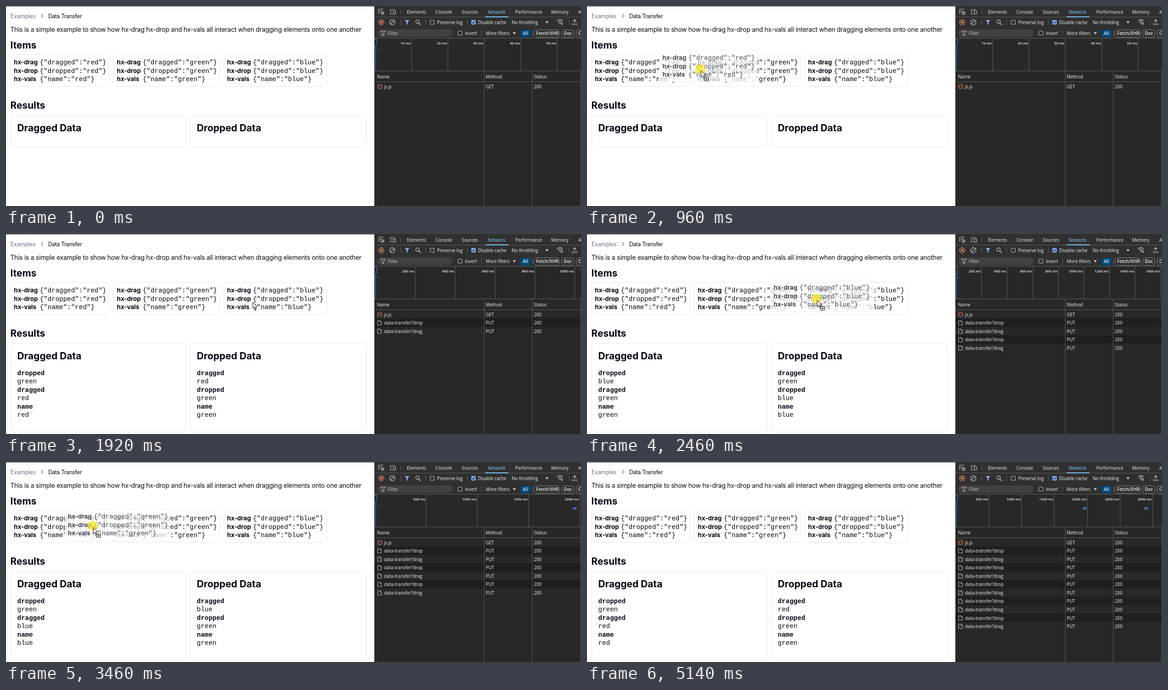
These frames come from a looping animation (1268 px wide and 442 px high, 5540 ms). An HTML page with a canvas:

```html
<!DOCTYPE html>
<html lang="en">
<head>
<meta charset="utf-8">
<title>Data Transfer</title>
<style>
html, body { margin: 0; width: 100%; height: 100%; overflow: hidden; background: #fff; }
canvas { display: block; }
</style>
</head>
<body>
<canvas id="stage" width="1268" height="442"></canvas>
<script>
const ctx = document.getElementById('stage').getContext('2d');
const LOOP = 5540, STEP = 68.1;
const SANS = 'Inter, sans-serif', MONO = '"Liberation Mono", monospace', UI = '"Open Sans", "Noto Sans", sans-serif';
const INK = '#020817', EDGE = '#e2e8f0', PANEL = '#282828', BAR = '#303030', LINE = '#5e5e5e';
const LIGHT = '#f0f0f0', ICON = '#c7c7c7', BLUE = '#7cacf8', ACTIVE = '#7fcfff';

const cards = [
  { name: 'red', x: 10, w: 218 },
  { name: 'green', x: 237, w: 234 },
  { name: 'blue', x: 480, w: 228 }
];

// Pointer path: step, x, y
const path = [
  [1, 1131, 436], [3, 880, 370], [6, 290, 190], [8, 68, 150], [9, 95, 153], [10, 102, 153],
  [12, 160, 148], [14, 251, 143], [16, 285, 145], [17, 290, 146], [21, 390, 148], [22, 407, 148],
  [24, 426, 148], [26, 535, 149], [27, 540, 150], [29, 548, 150], [31, 580, 152], [32, 583, 152],
  [34, 560, 149], [36, 507, 146], [38, 400, 147], [39, 385, 147], [40, 370, 146], [43, 235, 141],
  [46, 300, 148], [49, 215, 145], [50, 192, 144], [55, 192, 144], [57, 181, 153], [59, 192, 153],
  [62, 292, 150], [64, 330, 148], [65, 335, 150], [72, 1066, 436], [74, 1236, 437]
];

const drags = [
  { card: 0, from: 10, to: 16 },
  { card: 1, from: 22, to: 27 },
  { card: 2, from: 32, to: 39 },
  { card: 1, from: 46, to: 55 },
  { card: 0, from: 57, to: 64 }
];

// Results and timeline scale after each drop
const stages = [
  { at: 0, ms: 10, px: 80.3 },
  { at: 17, ms: 200, px: 88.1, drag: 'red', drop: 'green' },
  { at: 29, ms: 200, px: 56.4, drag: 'green', drop: 'blue' },
  { at: 40, ms: 500, px: 112.8, drag: 'blue', drop: 'green' },
  { at: 56, ms: 500, px: 90.3, drag: 'green', drop: 'red' },
  { at: 66, ms: 500, px: 72.3, drag: 'red', drop: 'green' }
];

function text(str, x, y, font, color, spacing = 0, align = 'left') {
  ctx.font = font;
  ctx.fillStyle = color;
  ctx.letterSpacing = spacing + 'px';
  ctx.textAlign = align;
  ctx.fillText(str, x, y);
}

function rect(x, y, w, h, color) {
  ctx.fillStyle = color;
  ctx.fillRect(x, y, w, h);
}

function round(x, y, w, h, r, fill, stroke) {
  ctx.beginPath();
  ctx.roundRect(x + 0.5, y + 0.5, w - 1, h - 1, r);
  if (fill) { ctx.fillStyle = fill; ctx.fill(); }
  if (stroke) { ctx.strokeStyle = stroke; ctx.lineWidth = 1; ctx.stroke(); }
}

function shape(d, x, y, stroke, fill, width = 1.2) {
  const p = new Path2D(d);
  ctx.save();
  ctx.translate(x, y);
  if (fill) { ctx.fillStyle = fill; ctx.fill(p); }
  if (stroke) { ctx.strokeStyle = stroke; ctx.lineWidth = width; ctx.stroke(p); }
  ctx.restore();
}

function circle(x, y, r, stroke, fill) {
  ctx.beginPath();
  ctx.arc(x, y, r, 0, 7);
  if (fill) { ctx.fillStyle = fill; ctx.fill(); }
  if (stroke) { ctx.strokeStyle = stroke; ctx.lineWidth = 1.3; ctx.stroke(); }
}

const ui = (str, x, y, color = LIGHT, weight = 500) => text(str, x, y, `${weight} 10px ${UI}`, color, -0.1);
const heading = (str, x, y) => text(str, x, y, `700 21.2px ${SANS}`, INK);
const mono = (str, x, y, weight = 400) => text(str, x, y, `${weight} 14.4px ${MONO}`, INK);

function drawCard({ name, x, w }, dx = 0, dy = 0) {
  ctx.save();
  ctx.translate(x + dx, 107 + dy);
  round(0, 0, w, 71, 7, '#fff', EDGE);
  ['drag', 'drop', 'vals'].forEach((word, i) => {
    const key = ['dragged', 'dropped', 'name'][i], y = 22 + i * 18.5;
    text('hx-' + word, 7.5, y, `700 13.5px ${SANS}`, INK);
    mono(`{"${key}":"${name}"}`, 64.4, y);
  });
  ctx.restore();
}

function drawResult(title, x, w, rows) {
  round(x, 241, w, rows ? 197 : 71, 7, '#fff', EDGE);
  heading(title, x + 14.8, 277);
  if (!rows) return;
  rows.forEach(([key, value], i) => {
    mono(key, x + 14.8, 311.5 + i * 37.1, 700);
    mono(value, x + 14.8, 330 + i * 37.1);
  });
}

function drawPage(stage) {
  rect(0, 0, 813, 442, '#fff');
  rect(0, 0, 813, 1, '#4a4a4a');
  text('Examples', 10, 27, `400 12.4px ${SANS}`, '#64748b', -0.15);
  shape('M0 0L4 4L0 8', 77.5, 18, '#64748b');
  text('Data Transfer', 93, 27, `400 12.4px ${SANS}`, INK, -0.4);
  text('This is a simple example to show how hx-drag hx-drop and hx-vals all interact when dragging elements onto one another',
    9.5, 56.5, `400 14px ${SANS}`, INK, -0.22);
  heading('Items', 9.5, 94);
  heading('Results', 9.5, 227);
  cards.forEach(card => drawCard(card));
  const { drag, drop } = stage;
  drawResult('Dragged Data', 10, 388, drag && [['dropped', drop], ['dragged', drag], ['name', drag]]);
  drawResult('Dropped Data', 406, 389, drag && [['dragged', drag], ['dropped', drop], ['name', drop]]);
}

const FUNNEL = 'M-5 -5H5L1.3 0V5H-1.3V0Z';
const ARROW = 'M-3.5 -2H3.5L0 3Z';

function drawTabs() {
  shape('M2 9H0V0H9V2M4 4L12 7L8.5 8.5L7 12ZM8.5 8.5L12 12', 822, 7, ICON);
  shape('M2 8V0H12M0 9.5H6M8 3H13V10H8Z', 846, 8, ICON);
  rect(870, 7, 1, 12, LINE);
  const tabs = [['Elements', 884], ['Console', 947], ['Sources', 1005], ['Network', 1062], ['Performance', 1123], ['Memory', 1202], ['A', 1262]];
  tabs.forEach(([name, x]) => ui(name, x, 17, name === 'Network' ? ACTIVE : LIGHT));
  rect(813, 24, 455, 1, LINE);
  rect(1057, 23, 51, 2, ACTIVE);
}

function checkbox(x, y, label, on) {
  round(x, y, 10, 10, 1.5, on ? BLUE : null, on ? BLUE : ICON);
  if (on) shape('M2 5L4.3 7.3L8.2 2.8', x, y, PANEL, null, 1.5);
  ui(label, x + 16 - (on ? 1 : 0), y + 9);
}

function drawToolbar() {
  circle(827.5, 36, 5.8, '#e88a62');
  rect(825, 33.5, 5, 5, '#e88a62');
  circle(852, 36, 5.8, ICON);
  shape('M-4 4L4 -4', 852, 36, ICON);
  shape(FUNNEL, 884.5, 36, null, BLUE);
  circle(907.5, 34.5, 3.8, ICON);
  shape('M0 0L5 5', 910, 37, ICON, null, 1.5);
  [870, 925, 1017, 1241].forEach(x => rect(x, 30, 1, 12, LINE));
  checkbox(935, 31, 'Preserve log');
  checkbox(1026, 31, 'Disable cache', true);
  ui('No throttling', 1115, 40);
  shape(ARROW, 1193, 36, null, ICON);
  shape('M-6.5 -2Q0 -8 6.5 -2M-4 1Q0 -3 4 1', 1221.5, 35, ICON);
  circle(1221, 38, 1.2, null, ICON);
  circle(1225.5, 39, 1.8, ICON);
  shape('M0 3V-6M-3.5 -2.5L0 -6L3.5 -2.5M-5 2V5H5V2', 1254, 36, ICON);
}

function drawFilters() {
  round(818, 51, 167, 18, 9, '#414141');
  shape(FUNNEL, 831.5, 60.5, ICON, null, 1);
  ui('Filter', 842, 64, ICON);
  checkbox(996, 55, 'Invert');
  rect(1048, 54, 1, 12, LINE);
  ui('More filters', 1058, 64);
  shape(ARROW, 1121, 60, null, ICON);
  round(1134, 52, 23, 18, 5, '#004a77');
  ui('All', 1139.5, 64, '#c2e7ff', 600);
  rect(1160, 54, 1, 12, LINE);
  [['Fetch/XHR', 1164, 57], ['Doc', 1225, 28], ['CSS', 1257, 30]].forEach(([name, x, w]) => {
    round(x, 52, w, 18, 5, null, '#8a8a8a');
    ui(name, x + 5, 64, LIGHT, 600);
  });
}

function drawTimeline(level) {
  const { ms, px } = stages[level];
  rect(813, 71, 455, 1, LINE);
  for (let i = 1; 813.6 + i * px < 1268; i++) {
    const x = Math.round(813.4 + i * px);
    rect(x, 72, 1, 71, LINE);
    text(`${i * ms} ms`, x - 1.5, 85, `600 7.9px ${UI}`, LIGHT, 0, 'right');
  }
  const bar = at => [100, 103].forEach(y => rect(813.8 + at / ms * px, y, 8.5, 2, '#3f86e0'));
  if (level > 2) bar(1933);
  if (level > 4) bar(2870);
  rect(815, 96, 11, 1, '#555');
  rect(814, 72, 1.5, 71, '#1a73b8');
  round(812, 73, 6, 15, 1.5, PANEL, '#1a86d0');
}

function drawRow(i) {
  const y = 168 + i * 18.55, mid = y + 10;
  if (i % 2) rect(813, y, 455, 18.55, '#1f1f1f');
  if (i) {
    shape('M0 0H5.5L8.5 3V9.5H0ZM5.5 0V3H8.5', 819.5, mid - 5, ICON, null, 1);
  } else {
    round(819, 173, 10, 10, 1, null, '#e88a62');
    shape('M3.8 3L2 5L3.8 7M6.2 3L8 5L6.2 7', 819, 173, '#e88a62', null, 1);
  }
  ui(i ? 'data-transfer?' + (i % 2 ? 'drop' : 'drag') : 'js.js', 833.5, mid + 3.6);
  ui(i ? 'PUT' : 'GET', 1058, mid + 3.6);
  ui('200', 1164, mid + 3.6);
}

function drawDevtools(level) {
  ctx.save();
  ctx.beginPath();
  ctx.rect(812, 0, 456, 442);
  ctx.clip();
  rect(812, 0, 456, 442, PANEL);
  rect(812, 0, 456, 72, BAR);
  drawTabs();
  drawToolbar();
  drawFilters();
  drawTimeline(level);
  for (let i = 0; i <= level * 2; i++) drawRow(i);
  rect(813, 143, 455, 1, LINE);
  rect(813, 167, 455, 1, LINE);
  [1054, 1160, 1267].forEach(x => rect(x, 144, 1, 298, LINE));
  ui('Name', 818, 159.5);
  ui('Method', 1058, 159.5);
  ui('Status', 1164, 159.5);
  rect(812, 0, 1, 442, LINE);
  ctx.restore();
}

function pointerAt(n) {
  const i = path.findIndex(p => p[0] >= n);
  if (i < 0 || n < path[0][0]) return null;
  const [n1, x1, y1] = path[i], [n0, x0, y0] = path[Math.max(0, i - 1)];
  const k = n1 === n0 ? 1 : (n - n0) / (n1 - n0);
  return { x: Math.round(x0 + (x1 - x0) * k), y: Math.round(y0 + (y1 - y0) * k) };
}

function drawPointer({ x, y }, copying) {
  shape('M0.5 0.5V14.5L3.7 11.6L6 16.7L8.3 15.7L6 10.8H10.5Z', x, y, '#000', '#fff', 1);
  if (!copying) return;
  round(x + 8, y + 14, 9, 9, 0, '#fff', '#000');
  rect(x + 10, y + 18, 5, 1, '#000');
  rect(x + 12, y + 16, 1, 5, '#000');
}

function draw(time) {
  const n = Math.floor((time % LOOP + 5) / STEP);
  const level = stages.findLastIndex(s => n >= s.at);
  const drag = drags.find(d => n >= d.from && n <= d.to);
  const pos = pointerAt(n);
  const moving = drag && n > drag.from;
  drawPage(stages[level]);
  drawDevtools(level);
  if (moving) {
    const grab = pointerAt(drag.from);
    ctx.globalAlpha = 0.74;
    drawCard(cards[drag.card], pos.x - grab.x, pos.y - grab.y);
    ctx.globalAlpha = 1;
  }
  if (drag) circle(pos.x - 1, pos.y - 3, 11, null, 'rgba(250, 230, 40, 0.75)');
  if (pos) drawPointer(pos, moving);
}

const start = performance.now();
function tick() {
  draw(performance.now() - start);
  requestAnimationFrame(tick);
}
tick();
</script>
</body>
</html>
```
